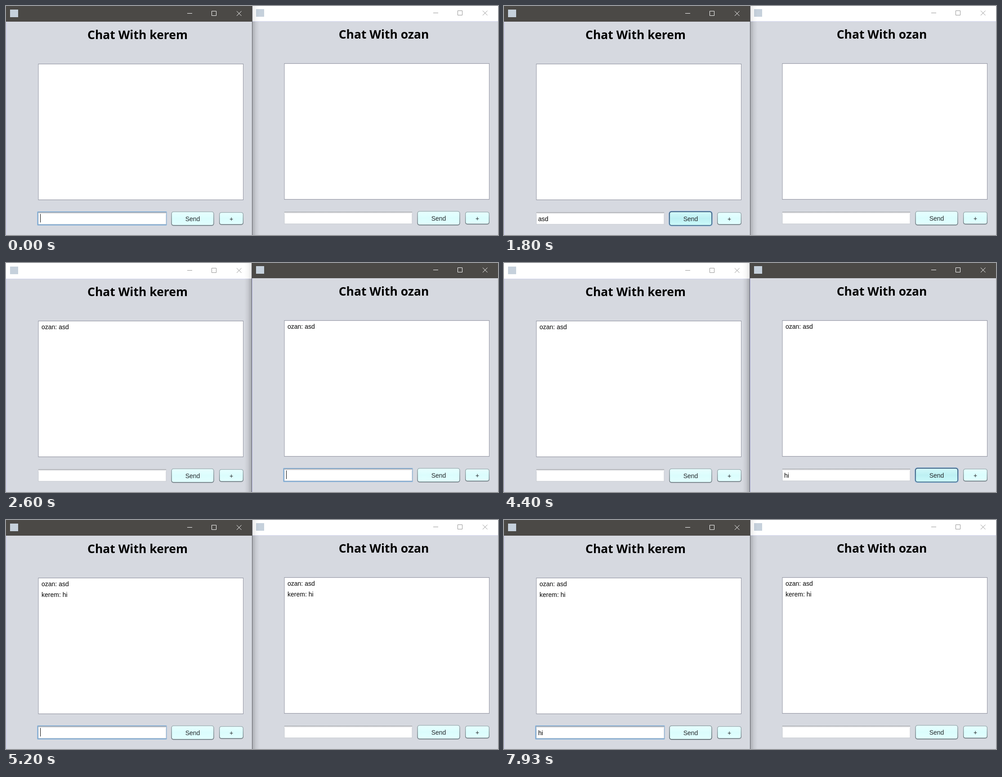
Recreate the animation shown at these times as an HTML page with a canvas. Size 1094x512 px, loop 8000 ms.

```html
<!DOCTYPE html>
<html lang="en">
<head>
<meta charset="utf-8">
<title>Two chat windows</title>
<style>
  html, body { margin: 0; width: 100%; height: 100%; overflow: hidden; }
  canvas { display: block; width: 1094px; height: 512px; }
</style>
</head>
<body>
<canvas id="stage" width="1094" height="512"></canvas>
<script>
const ctx = document.getElementById('stage').getContext('2d');
const LOOP = 8000;
const UI = '14px "Liberation Sans", Arial, sans-serif';
const HEADING = 'bold 26.5px "Open Sans", "Noto Sans", sans-serif';
const messages = ['ozan: asd', 'kerem: hi'];

// Each step changes part of the state; the rest carries over.
const steps = [
  [0, { active: 0, focus: 'field', text: '', caret: true, lines: 0, hover: '', pressed: false }],
  [270, { text: 'as' }],
  [330, { text: 'asd', hover: 'send0' }],
  [870, { caret: false, hover: '' }],
  [1400, { caret: true }],
  [1600, { hover: 'send0' }],
  [1800, { focus: 'send', pressed: true }],
  [1930, { pressed: false, text: '', lines: 1 }],
  [2130, { hover: 'plus0' }],
  [2200, { hover: '' }],
  [2600, { active: 1, focus: 'field', caret: true }],
  [3130, { caret: false }],
  [3470, { text: 'h', caret: true }],
  [3930, { text: 'hi', hover: 'plus1' }],
  [4200, { hover: 'send1' }],
  [4400, { focus: 'send', pressed: true }],
  [4470, { pressed: false, text: '', lines: 2 }],
  [4600, { hover: '' }],
  [4800, { hover: 'send0' }],
  [4870, { hover: '' }],
  [5200, { active: 0, focus: 'field', caret: true }],
  [5730, { caret: false }],
  [6130, { hover: 'send0' }],
  [6200, { hover: 'plus0' }],
  [6270, { caret: true }],
  [6330, { text: 'i' }],
  [6670, { caret: false, hover: '' }],
  [7130, { text: '', caret: true }],
  [7330, { text: 'h' }],
  [7400, { text: 'hi' }],
  [7870, { caret: false }],
  [7930, { hover: 'send0' }]
];

function stateAt(time) {
  return Object.assign({}, ...steps.filter(s => s[0] <= time).map(s => s[1]));
}

function box(x, y, w, h, color) {
  ctx.fillStyle = color;
  ctx.fillRect(x, y, w, h);
}

function round(x, y, w, h, r, fill) {
  ctx.beginPath();
  ctx.roundRect(x, y, w, h, r);
  ctx.fillStyle = fill;
  ctx.fill();
}

function label(str, x, y, font = UI, align = 'left', color = '#000') {
  ctx.font = font;
  ctx.textAlign = align;
  ctx.fillStyle = color;
  ctx.fillText(str, x, y);
}

function fade(x0, y0, x1, y1, ...colors) {
  const g = ctx.createLinearGradient(x0, y0, x1, y1);
  colors.forEach((c, i) => g.addColorStop(i / (colors.length - 1), c));
  return g;
}

function titleBar(active) {
  box(0, 0, 547, 35, active ? '#4b4946' : '#fff');
  box(9, 8, 18, 17, '#c6d1dc');
  ctx.strokeStyle = active ? '#fff' : '#959595';
  ctx.lineWidth = 1;
  ctx.beginPath();
  ctx.moveTo(403, 16.5);
  ctx.lineTo(414, 16.5);
  ctx.rect(457.5, 11.5, 10, 10);
  ctx.moveTo(513, 11.5);
  ctx.lineTo(523.5, 22);
  ctx.moveTo(523.5, 11.5);
  ctx.lineTo(513, 22);
  ctx.stroke();
}

function field(focused, text, caret) {
  if (focused) {
    round(69, 459, 289, 32, 2, '#a9c3de');
    round(70, 460, 287, 30, 1, '#73a4d1');
  }
  box(71.5, 461, 285, 27.5, focused ? '#c3c9d1' : '#c6c9cf');
  box(72.5, 461, 283, 26.5, '#fff');
  box(72, 461, 284, 5, fade(0, 461, 0, 466, '#8d9096', '#d5d6d9', '#f5f5f6', '#fff'));
  label(text, 76, 481);
  if (focused && caret) {
    ctx.font = UI;
    box(76 + Math.round(ctx.measureText(text).width), 465, 1, 19, '#000');
  }
}

function button(str, x, y, w, h, look) {
  if (look.focused) {
    round(x - 1.5, y - 1.5, w + 3, h + 3, 6, '#a0bddb');
    round(x - .7, y - .7, w + 1.4, h + 1.4, 6, '#6696c4');
  } else {
    round(x, y + 1, w, h, 5, 'rgba(90,100,110,.4)');
  }
  const edge = look.pressed ? ['#27405e', '#3d6079']
    : look.hover ? ['#87969b', '#46545a'] : ['#9aabb0', '#647177'];
  const fill = look.pressed ? ['#d4fafa', '#bdf0f3', '#cdfbfb']
    : ['#e8ffff', '#dbfdfd', '#e3ffff'];
  round(x, y, w, h, 5, fade(0, y, 0, y + h, ...edge));
  round(x + 1.3, y + 1.3, w - 2.6, h - 2.6, 4, fade(0, y, 0, y + h, ...fill));
  label(str, x + w / 2, y + h / 2 + 5.5, UI, 'center', '#25282b');
}

function chatWindow(id, s) {
  const active = s.active === id;
  const focus = active ? s.focus : '';
  ctx.save();
  ctx.translate(id * 547, -id);
  box(0, 35, 547, 478, '#d6d9e0');
  titleBar(active);
  box(0, 35, 1, 478, '#c9cbf6');
  if (!active) box(0, 35, 547, 1, '#d2d5ef');

  label('Chat With ' + ['kerem', 'ozan'][id], id ? 293 : 292.5, 74, HEADING, 'center');

  box(71.5, 129, 456.5, 305, '#9295a2');
  box(72.5, 130.2, 454.5, 302.6, '#fff');
  messages.slice(0, s.lines).forEach((m, i) => label(m, 79, 148 + 24 * i));

  field(focus === 'field', active ? s.text : '', s.caret);
  button('Send', 367.5, 459.5, 95, 31.5, {
    focused: focus === 'send',
    pressed: active && s.pressed,
    hover: s.hover === 'send' + id
  });
  button('+', 474, 461, 54, 28, { hover: s.hover === 'plus' + id });
  ctx.restore();
}

// The active window casts a shadow over its neighbour.
function seam(active) {
  const edge = active ? 546 : 547;
  const far = active ? edge - 16 : edge + 17;
  const left = Math.min(edge, far);
  const shade = a => fade(edge, 0, far, 0, `rgba(0,0,0,${a})`, `rgba(0,0,0,${a * .3})`, 'rgba(0,0,0,0)');
  box(left, 0, 17, 35, shade(.1));
  box(left, 35, 17, 477, shade(.22));
  box(edge, 0, 1, 512, '#5b5c62');
}

function frame(now) {
  const s = stateAt(now % LOOP);
  chatWindow(0, s);
  chatWindow(1, s);
  seam(s.active);
  requestAnimationFrame(frame);
}
frame(performance.now());
</script>
</body>
</html>
```
